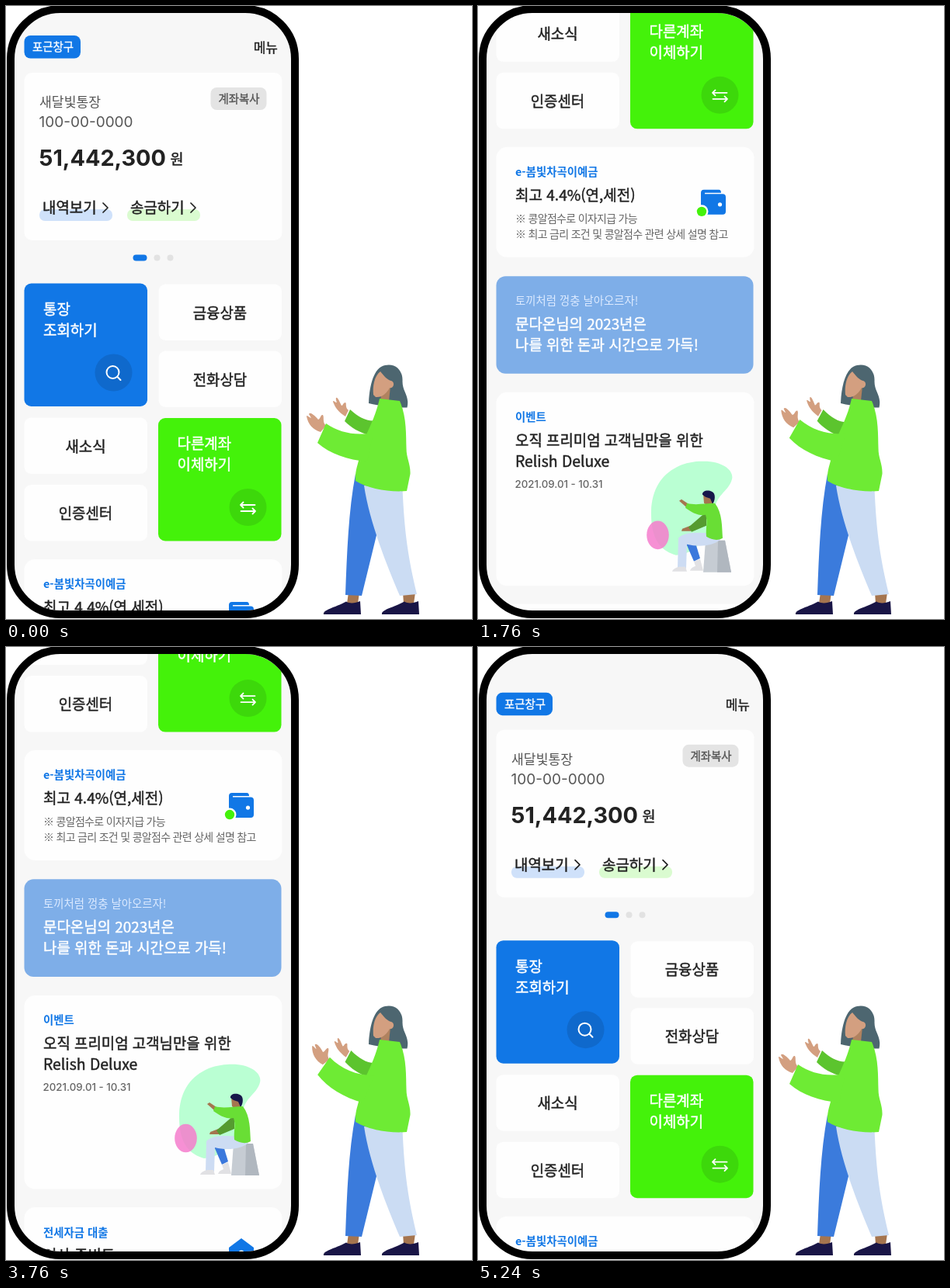
Animation of 600 by 790 pixels, one loop 5280 ms. Source, as an HTML page:

```html
<!DOCTYPE html>
<html lang="ko">
<head>
<meta charset="utf-8">
<style>
html, body { margin: 0; width: 100%; height: 100%; overflow: hidden; background: #fff; }
svg { display: block; }
text { font-family: "Noto Sans CJK KR", "Noto Sans CJK", "Noto Sans", sans-serif; white-space: pre; }
.num { font-family: Inter, Roboto, sans-serif; }
.note { letter-spacing: -.05em; }
.line { fill: none; stroke-linecap: round; stroke-linejoin: round; }
</style>
</head>
<body>
<svg width="600" height="790" viewBox="0 0 600 790">
  <defs><clipPath id="screen"><rect x="11" y="9" width="356" height="770" rx="59"/></clipPath></defs>
  <rect x="6" y="4" width="366" height="780" rx="64" fill="#f7f7f7"/>
  <g clip-path="url(#screen)"><g id="page"></g></g>
  <rect x="6" y="4" width="366" height="780" rx="64" fill="none" stroke="#000" stroke-width="10"/>

  <g id="woman">
    <path fill="#a5754f" d="M441 756h14l-2 14h-14zM511 756h16l-2 14h-13z"/>
    <path id="shoe" fill="#191546" d="M409 784C408 778 422 776 438 767.500C444 771 450 769 456 767L457 784Z"/>
    <use href="#shoe" x="75"/>
    <path fill="#3b7bdc" d="M450 603C441 650 439 705 437 759L458 760L478 678L470 618Z"/>
    <path fill="#cbdcf3" d="M461 618C468 665 490 720 507 760L529 758C518 712 513 680 510.500 622Z"/>
    <g id="backArm">
      <path fill="#d39f80" d="M441 521C436 517 439 512 437 511C434 511 434 515 432 515C429 509 427 504 425 505C424 508 427 511 425 511C422 509 421 508 421 510C424 518 428 523 437 529Z"/>
      <path fill="#5cc42e" d="M443 520C455 531 466 536 477 534L468 553C455 550 444 543 436 535Z"/>
    </g>
    <path fill="#4d6670" d="M467 512C468 490 473 466 488 463C502 460 511 470 510.500 483C510 497 520 502 516.500 517.500C505 518 484 516 467 512Z"/>
    <path fill="#b0825f" d="M484 497L495 490L493 509L482 508Z"/>
    <path fill="#d39f80" d="M473 501C472 490 474 477 482 471C487 477 491 482 496 483A4 4.500 0 0 1 494 492C490 499 484 505 476 504Z"/>
    <path fill="#6eeb34" d="M481 506L507 509C516 530 515 552 515.500 570C515.500 583 521 590 520.500 603L516 625C494 627 466 622 450 612C449 600 453 591 455 582C455 562 473 542 481 506Z"/>
    <g id="frontArm">
      <path fill="#d39f80" d="M412 541C407 536 410 530 408 527C405 526 405 532 402 533C396 526 391 523 390 526L393 531C390 530 387 526 387 529C389 539 395 546 405 549Z"/>
      <path fill="#6eeb34" d="M412 538C430 550 449 554 473 550L465 587C440 585 417 577 401 563Z"/>
    </g>
  </g>
</svg>

<script>
const LOOP = 5280, BLUE = '#1177e6', GREEN = '#44f20a', INK = '#222', GREY = '#555';
const $ = id => document.getElementById(id);

const rect = (x, y, w, h, r, fill = '#fefefe') =>
  `<rect x="${x}" y="${y}" width="${w}" height="${h}" rx="${r}" fill="${fill}"/>`;
const dot = (x, y, r, fill) => `<circle cx="${x}" cy="${y}" r="${r}" fill="${fill}"/>`;
const path = (d, fill) => `<path d="${d}" fill="${fill}"/>`;
const line = (d, color, width = 2) => `<path class="line" d="${d}" stroke="${color}" stroke-width="${width}"/>`;

// A thin outline gives the medium weight, as the Korean font has only regular and bold
const text = (x, y, s, size = 18.9, fill = INK, weight = 500, anchor = 'start', cls = '') =>
  `<text class="${cls}" x="${x}" y="${y}" font-size="${size}" fill="${fill}" font-weight="${weight}" text-anchor="${anchor}"` +
  (weight === 500 && !cls ? ` stroke="${fill}" stroke-width="${size * 0.024}"` : '') + `>${s}</text>`;
const num = (x, y, s, size, fill, weight) => text(x, y, s, size, fill, weight, 'start', 'num');
const note = (y, s) => text(48, y, s, 14, '#666', 400, 'start', 'note');
const heading = (y, s) => text(48, y, s, 14.4, BLUE, 700);
const link = (x, label, tint) =>
  rect(x, 262, 94, 15, 7, tint) + text(x + 4, 267, label) + line(`M${x + 82} 254l6 6-6 6`, INK, 1.7);
const tile = (x, y, label) => rect(x, y, 158.5, 72.5, 9) + text(x + 79, y + 44, label, 18.9, INK, 500, 'middle');

const account = [
  rect(23.5, 38, 72.5, 29.5, 8, BLUE),
  text(60.5, 58, '포근창구', 14.4, '#fff', 500, 'middle'),
  text(350, 60, '메뉴', 17, INK, 500, 'end'),
  rect(23.5, 86, 332, 216, 10),
  text(43, 130, '새달빛통장', 17.2, GREY, 400),
  num(42.5, 156, '100-00-0000', 19, GREY, 400),
  rect(263.5, 105, 72, 29, 8, '#e4e4e4'),
  text(300, 125, '계좌복사', 14.4, GREY, 500, 'middle'),
  num(42.5, 206, '51,442,300', 28.8, INK, 700),
  text(211.5, 204, '원', 18.5),
  link(43, '내역보기', '#cfe1fa'),
  link(156, '송금하기', '#dafbd0'),
  rect(163.5, 320.5, 18, 8, 4, BLUE),
  dot(194.5, 324.5, 4, '#e2e2e2'),
  dot(211.5, 324.5, 4, '#e2e2e2')
];

const tiles = [
  rect(23.5, 357.5, 158.5, 158.5, 9, BLUE),
  text(48, 398, '통장', 18.9, '#fff'),
  text(48, 425, '조회하기', 18.9, '#fff'),
  dot(138.5, 472.5, 24, '#0f69cc'),
  line('M145.500 472a8 8 0 1 0-16 0a8 8 0 1 0 16 0M143.500 478l4 4', '#fff'),
  tile(196.5, 358.5, '금융상품'),
  tile(196.5, 444.5, '전화상담'),
  tile(23.5, 530.5, '새소식'),
  tile(23.5, 617, '인증센터'),
  rect(196, 531, 158.5, 158.5, 9, GREEN),
  text(220.5, 571, '다른계좌', 18.9, '#fff'),
  text(220.5, 598, '이체하기', 18.9, '#fff'),
  dot(311.5, 646, 24, '#3dd80b'),
  line('M305.500 639.500l-3.500 3.500 3.500 3.500M302 643h18.500M317.500 647.500l3.500 3.500-3.500 3.500M321 651h-18.500', '#fff', 1.8)
];

const offers = [
  rect(23.5, 713, 332, 142, 14),
  heading(750, 'e-봄빛차곡이예금'),
  text(48, 782, '최고 4.4%(연,세전)', 19),
  note(810, '※ 콩알점수로 이자지급 가능'),
  note(830, '※ 최고 금리 조건 및 콩알점수 관련 상세 설명 참고'),
  path('M291 768h19q3 0 3 4h-21v1.500h23q4 0 4 4v18.500q0 4-4 4h-24q-4 0-4-4v-24q0-4 4-4z', BLUE),
  dot(311.5, 787, 2.6, '#fff'),
  dot(288, 796, 8.5, '#fefefe'),
  dot(288, 796, 6.2, GREEN),
  rect(23.5, 879.3, 331, 125.7, 12, '#7eaee8'),
  text(48, 916, '토끼처럼 껑충 날아오르자!', 14.4, '#dceaff', 400),
  text(48, 948, '문다온님의 2023년은', 18.9, '#fff'),
  text(48, 975, '나를 위한 돈과 시간으로 가득!', 18.9, '#fff'),
  rect(23.5, 1029, 332, 249.5, 14),
  heading(1066, '이벤트'),
  text(48, 1098, '오직 프리미엄 고객님만을 위한'),
  text(48, 1125, 'Relish Deluxe', 19.4),
  num(47.5, 1152, '2021.09.01 - 10.31', 13.3, '#666', 500),
  rect(23.5, 1302, 332, 126, 14),
  heading(1339.5, '전세자금 대출'),
  text(48, 1371, '이사 준비도'),
  text(48, 1398, '모바일도 간편하게!'),
  path('M303 1342l16 12v15h-11.500v-7a4.500 4.500 0 0 0-9 0v7h-11.500v-15z', BLUE),
  rect(287, 1377, 32, 7, 3.5, GREEN)
];

const sitter = [
  path('M223 650C224 610 250 588 285 586C315 584 330 598 327 609C324 622 311 627 306 642C300 668 290 705 255 707C238 702 222 690 223 650Z', '#baffd3'),
  '<ellipse cx="231.5" cy="681" rx="14.3" ry="18.3" fill="#f57dcd" opacity=".85"/>',
  path('M293 688h25l8 41h-36z', '#c6ccd3'),
  path('M309 688h9l8 41h-18z', '#b0b7bf'),
  path('M268 692L279 688L286 711L278 715Z', '#3b78dc'),
  path('M278 715l8-3 4 15h-17q1-4 7-6z', '#e1e1e4'),
  path('M306 680C290 677 265 676 258 685L257 724L268 724L269 693C285 697 303 695 312 687Z', '#cddcf3'),
  path('M259 722h8l2 6h-19q1-4 9-6z', '#e1e1e4'),
  path('M276 668L263 673L262 676L274 676Z', '#a5754f'),
  path('M294 651L271 671L275 677L294 669Z', '#559b30'),
  path('M291 636L302 636L303 645L295 645Z', '#a5754f'),
  path('M290 628h10v11q-6 4-9 1z', '#a5754f'),
  path('M289 629C288 624 296 622 301 625C307 627 305 638 302 641L299 634L293 632Z', '#17174a'),
  path('M271 641L262 635L259 637L268 645Z', '#a5754f'),
  path('M269 640C281 643 292 640 305 640C315 653 314 671 315 685C308 689 301 687 294 683C293 672 296 664 293 655C285 657 275 652 267 646Z', '#69de35')
];

$('page').innerHTML = [...account, ...tiles, ...offers, '<g transform="translate(0 532)">', ...sitter, '</g>'].join('');

// Eased value between [time, value] keys
function ease(keys, t) {
  const i = keys.findIndex(k => k[0] > t);
  if (i === 0) return keys[0][1];
  if (i < 0) return keys[keys.length - 1][1];
  const [t0, a] = keys[i - 1], [t1, b] = keys[i], x = (t - t0) / (t1 - t0);
  return a + (b - a) * x * x * (3 - 2 * x);
}

const scroll = [[820, 0], [2180, -686.5], [3355, -686.5], [5012, 20.7]];
const swing = [[0, 0], [1100, 11.5], [2440, 0], [3880, 11.5], [5200, 0]];
const nudge = [[960, 0], [2200, 5], [3400, 5], [4040, 1.5], [4600, 5], [5200, 0]];

function draw() {
  const t = performance.now() % LOOP;
  $('page').setAttribute('transform', `translate(0 ${ease(scroll, t)})`);
  $('frontArm').setAttribute('transform', `rotate(${ease(swing, t)} 461 558)`);
  $('backArm').setAttribute('transform', `rotate(${ease(nudge, t)} 442 545)`);
  requestAnimationFrame(draw);
}
draw();
</script>
</body>
</html>
```
